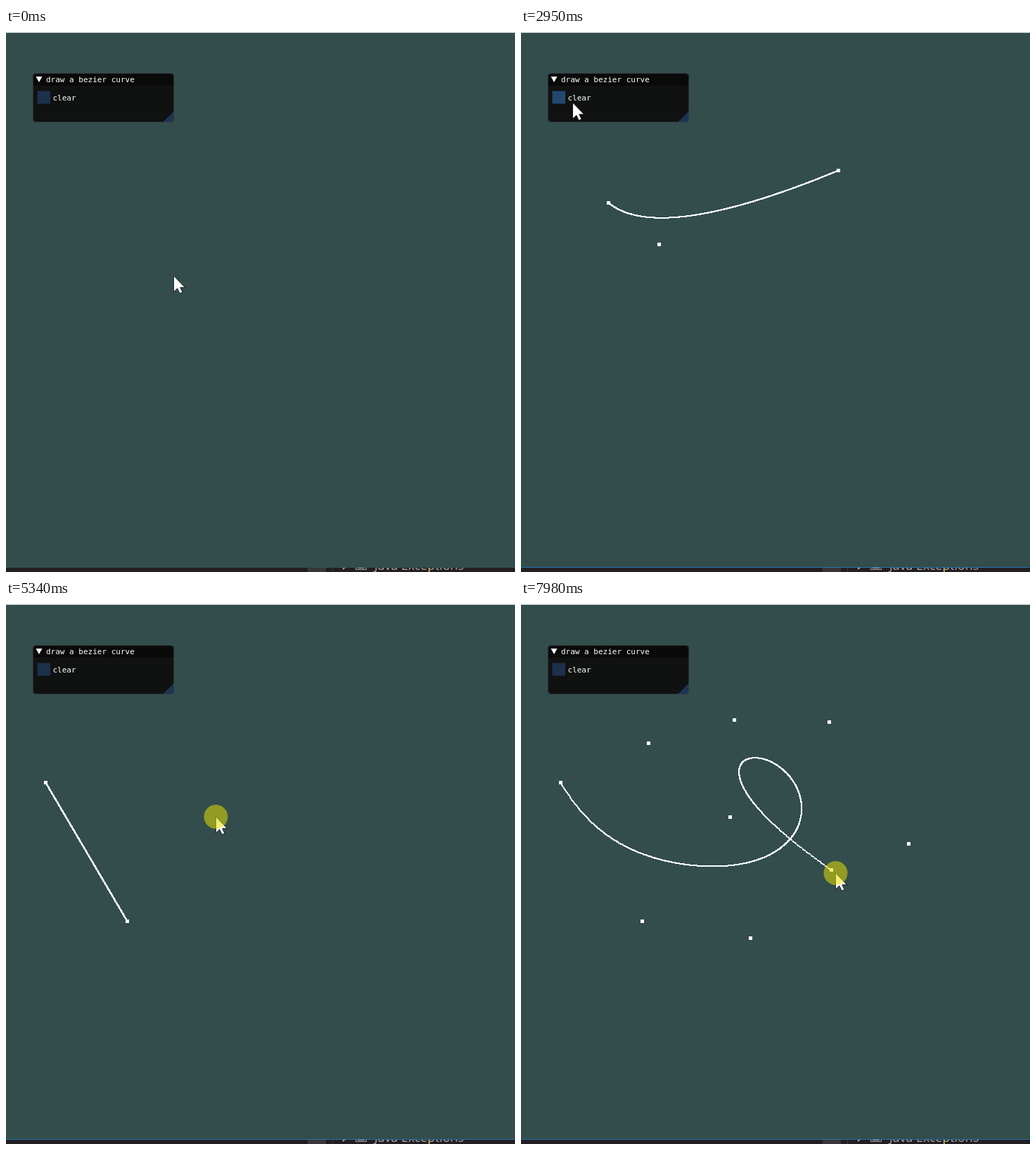
These frames come from a looping animation (724 by 773 pixels, 8 s). An HTML page with a canvas:

```html
<!DOCTYPE html>
<html lang="en">
<head>
<meta charset="utf-8">
<title>Bezier curve drawing</title>
<style>
  html, body { margin: 0; width: 100%; height: 100%; overflow: hidden; background: #334d4d; }
  svg, canvas { position: absolute; left: 0; top: 0; width: 724px; height: 773px; }
  .ui { font: 11px "DejaVu Sans Mono", monospace; fill: #fff; }
  .ide { font: 17.8px "Open Sans", sans-serif; fill: #aaa8ac; }
  #title { fill: #0a0a0a; }
  #title.active { fill: #294a7a; }
  #box { fill: #1d304c; }
  #box.hover { fill: #234870; }
  #box.pressed { fill: #3069aa; }
</style>
</head>
<body>
<svg viewBox="0 0 724 773">
  <defs>
    <clipPath id="below"><path d="M0 767H724V773H0Z"/></clipPath>
  </defs>
  <path d="M0 0H724V6H0Z" fill="#fff"/>
  <path d="M0 6H724V7H0Z" fill="#c4cbcb"/>
  <path d="M0 767H724V773H0Z" fill="#231e22"/>
  <g clip-path="url(#below)">
    <path d="M429 767H455V773H429Z" fill="#39363b"/>
    <path d="M464.5 767V773" stroke="#3d3a3e"/>
    <path d="M479 770L483 767H479Z" fill="#aaa8ac"/>
    <path d="M497.5 760V769.5H512.5V760M500 767.5H510" fill="none" stroke="#aaa8ac"/>
    <text class="ide" x="524" y="769.5">Java Exceptions</text>
    <path d="M602 767V773" stroke="#b89a4a" stroke-width="2"/>
  </g>
  <path id="focus" d="M0 766.5H724" stroke="#2874a8"/>
  <rect x="38" y="64.5" width="201" height="69.5" rx="5" fill="#101211"/>
  <path id="title" d="M38 82V69.5Q38 64.5 43 64.5H234Q239 64.5 239 69.5V82Z"/>
  <path d="M223.5 133.5L238.5 118.5V129Q238.5 133.5 234 133.5Z" fill="#1e3453"/>
  <rect x="38.5" y="64.5" width="200" height="69" rx="5" fill="none" stroke="#6e6e80" stroke-opacity=".3"/>
  <path d="M42.5 69H51.5L47 77Z" fill="#fff"/>
  <text class="ui" x="57" y="77">draw a bezier curve</text>
  <rect id="box" x="44.5" y="89.5" width="18.5" height="18"/>
  <text class="ui" x="66.5" y="103">clear</text>
</svg>
<canvas id="plot" width="724" height="773"></canvas>
<svg viewBox="0 0 724 773">
  <g id="pointer">
    <path d="M.5 0V23L5.8 18L9.2 25.3L13 23.6L9.8 16.7H16.6Z" fill="#fff" stroke="#111" stroke-width=".9"/>
    <circle id="press" cx=".5" r="17" fill="#e6e000" fill-opacity=".53"/>
  </g>
</svg>
<script>
const LOOP = 8000, STEP = 75, REACTION = 70, SAMPLES = 1000;
const get = id => document.getElementById(id);
const ctx = get('plot').getContext('2d');

// One stop of the pointer: travel from leave to arrive, then a click of the given hold
const stop = (x, y, leave, arrive, press, hold = 75, bend = 0) =>
  ({ x, y, leave, arrive, press, hold, bend });

const clearing = stop(55, 102, 2490, 3090, 3260, 150);
const stops = [
  stop(125, 248, 240, 465, 620),
  stop(197, 307, 850, 1150, 1160),
  stop(452, 202, 1390, 1690, 1790, 70),
  clearing,
  stop(57, 259, 3960, 4335, 4420),
  stop(173, 456, 4650, 4950, 5040),
  stop(298, 308, 5190, 5340, 5340, 160),
  stop(327, 480, 5650, 5800, 5800),
  stop(552, 346, 5960, 6260, 6190, 150, .245),
  stop(439, 173, 6340, 6565, 6580),
  stop(304, 170, 6730, 7030, 7040, 240),
  stop(182, 203, 7280, 7540, 7500, 75, -.06),
  stop(442, 383, 7750, 7900, 7900, 100),
  stop(447, 388, 7980, LOOP)
];

const next = stops[stops.indexOf(clearing) + 1];
const drawn = stops.filter(s => s !== clearing && s.press);
const clearedAt = clearing.press + REACTION;
const within = (t, from, to) => t >= from && t < to;

function pointerAt(t) {
  let x = 238, y = 352;
  for (const s of stops) {
    if (t < s.leave) break;
    const elapsed = (Math.floor((t - s.leave) / STEP) + 1) * STEP;
    const u = Math.min(1, elapsed / (s.arrive - s.leave));
    const eased = 1 - (1 - u) ** 1.5;
    const bulge = 4 * eased * (1 - eased) * s.bend;
    const dx = s.x - x, dy = s.y - y;
    x += dx * eased - dy * bulge;
    y += dy * eased + dx * bulge;
  }
  return [Math.round(x), Math.round(y)];
}

function bezier(points, u) {
  let level = points;
  while (level.length > 1) {
    level = level.slice(1).map(([x, y], i) => [
      level[i][0] + (x - level[i][0]) * u,
      level[i][1] + (y - level[i][1]) * u
    ]);
  }
  return level[0];
}

function dot([x, y], size) {
  ctx.fillRect(Math.round(x - size / 2), Math.round(y - size / 2), size, size);
}

function drawCurve(points) {
  ctx.clearRect(0, 0, 724, 773);
  ctx.fillStyle = '#fff';
  points.forEach(p => dot(p, 5));
  if (points.length < 2) return;
  for (let i = 0; i <= SAMPLES; i++) dot(bezier(points, i / SAMPLES), 2);
}

let shown = '';
function render(t) {
  const points = drawn
    .filter(s => s.press + REACTION <= t && (t < clearedAt || s.press > clearedAt))
    .map(s => [s.x - .5, s.y + .5]);
  const key = points.join();
  if (key !== shown) drawCurve(points);
  shown = key;

  get('pointer').setAttribute('transform', `translate(${pointerAt(t)})`);
  const down = stops.some(s => within(t, s.press, s.press + s.hold));
  get('press').style.display = down ? '' : 'none';
  get('focus').style.display = t >= stops[0].press ? '' : 'none';
  get('title').classList.toggle('active', within(t, clearing.press, next.press));
  get('box').classList.toggle('hover', within(t, clearing.arrive - 2 * STEP, next.leave));
  get('box').classList.toggle('pressed', within(t, clearing.press, clearedAt));
}

const began = performance.now();
function tick() {
  render((performance.now() - began) % LOOP);
  requestAnimationFrame(tick);
}
tick();
</script>
</body>
</html>
```
